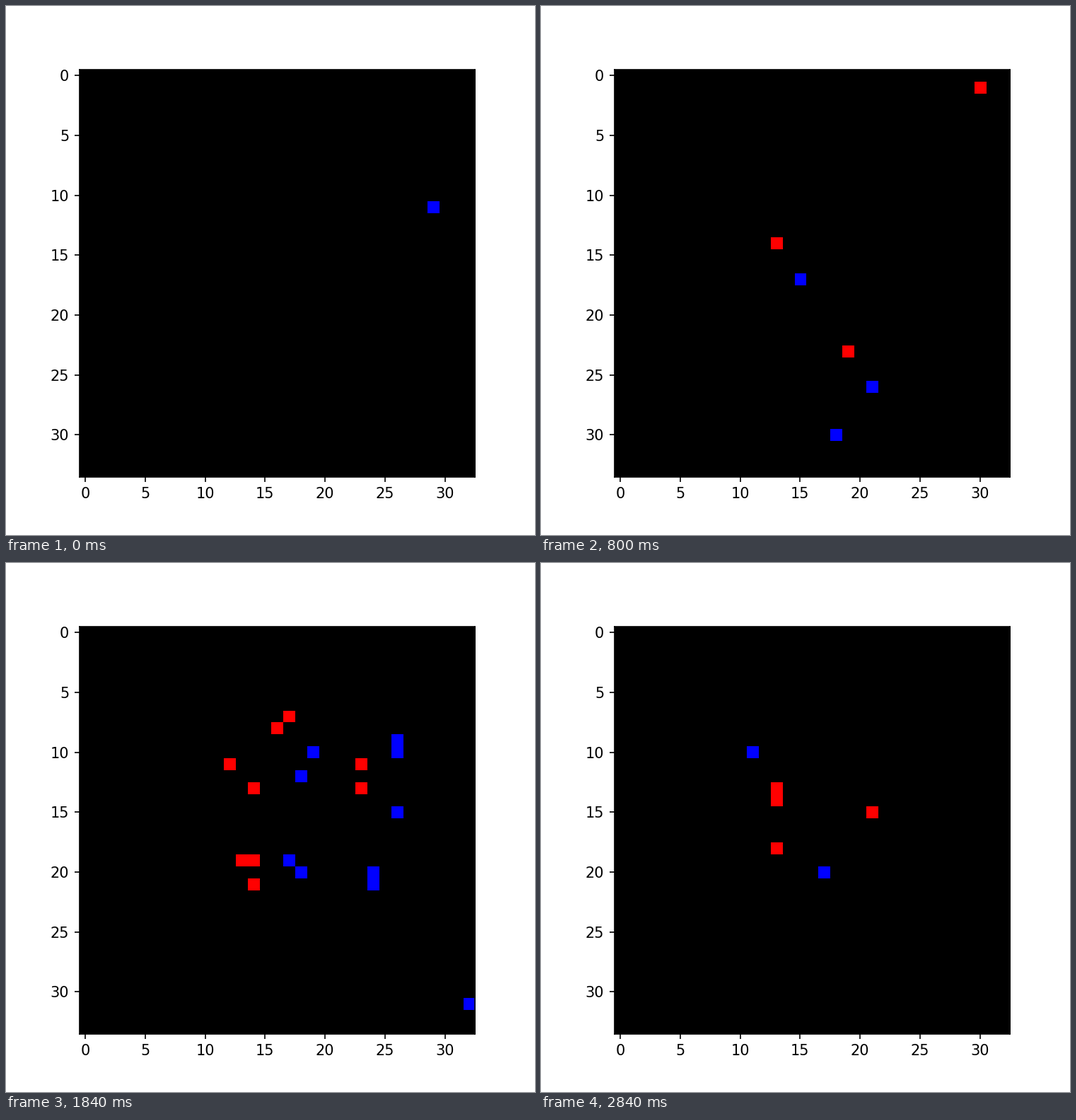
Animation, 748 px wide and 748 px high, one loop 2880 ms. Source, as a matplotlib script:

```python
import numpy as np
import matplotlib.pyplot as plt
from matplotlib.animation import FuncAnimation

SIZE, DPI = 748, 150
ROWS, COLS = 34, 33
FRAMES, INTERVAL, SWEEP = 72, 40, 24
OFF, ON = (255, 0, 0), (0, 0, 255)

# Ring: semi-axes, slant, half stroke width, edge softness
A, B, SLANT, HALF, SOFT = 4.35, 8.2, 0.14, 1.7, 0.4

# The ring's centre runs from corner to corner, one sweep each
CORNERS = [(14.3, 15.3), (16.8, 20.5), (19.7, 14.9), (15.4, 15.1)]
# First and last heading in degrees (y down), moment of the burst, afterglow
SWEEPS = [((90, 50), 9, 0.27), ((-65, 0), 9, 0.5), ((180, 180), 12, 0.32)]
PEAK, SPREAD, THRESHOLD = 2.1, 5, 0.2
NOISE = 1.2

yy, xx = np.mgrid[0:ROWS, 0:COLS].astype(float)


def smooth(t):
    t = min(max(t, 0.0), 1.0)
    return t * t * (3 - 2 * t)


def ring(x, y):
    """Brightness of a slanted ring around the origin."""
    x = x + SLANT * y + 1e-6
    q = np.hypot(x / A, y / B)
    d = (q - 1) * q / np.hypot(x / A**2, y / B**2)
    return 1 / (1 + np.exp((np.abs(d) - HALF) / SOFT))


def brightness_change(center, angle, step=0.3):
    """Change per cell as the ring moves along its heading, edges near +-1."""
    x, y = xx - center[0], yy - center[1]
    dx, dy = step * np.cos(angle), step * np.sin(angle)
    return (ring(x - dx, y - dy) - ring(x + dx, y + dy)) * 2 * SOFT / step


def events(frame):
    sweep, k = divmod(frame, SWEEP)
    heading, burst, glow = SWEEPS[sweep]
    rng = np.random.default_rng(500 + frame)

    start, end = np.array(CORNERS[sweep:sweep + 2])
    center = start + (end - start) * smooth((k - burst + 6) / 17)
    angle = np.radians(np.interp(k, (4, SWEEP - 2), heading))
    change = brightness_change(center, angle)

    activity = PEAK * np.exp(-((k - burst) / SPREAD) ** 2) + glow * (k > burst)
    fired = rng.random((ROWS, COLS)) < activity * np.abs(change) - THRESHOLD

    img = np.zeros((ROWS, COLS, 3), np.uint8)
    img[fired & (change > 0)] = ON
    img[fired & (change < 0)] = OFF
    for _ in range(rng.poisson(NOISE)):
        img[rng.integers(ROWS), rng.integers(COLS)] = (OFF, ON)[rng.integers(2)]
    return img


fig, ax = plt.subplots(figsize=(SIZE / DPI, SIZE / DPI), dpi=DPI)
picture = ax.imshow(events(0), interpolation="nearest")
ax.set_xticks(range(0, 31, 5))
ax.set_yticks(range(0, 31, 5))


def update(frame):
    picture.set_data(events(frame))
    return [picture]


anim = FuncAnimation(fig, update, frames=FRAMES, interval=INTERVAL,
                     repeat=True, repeat_delay=0)
plt.show()
```
